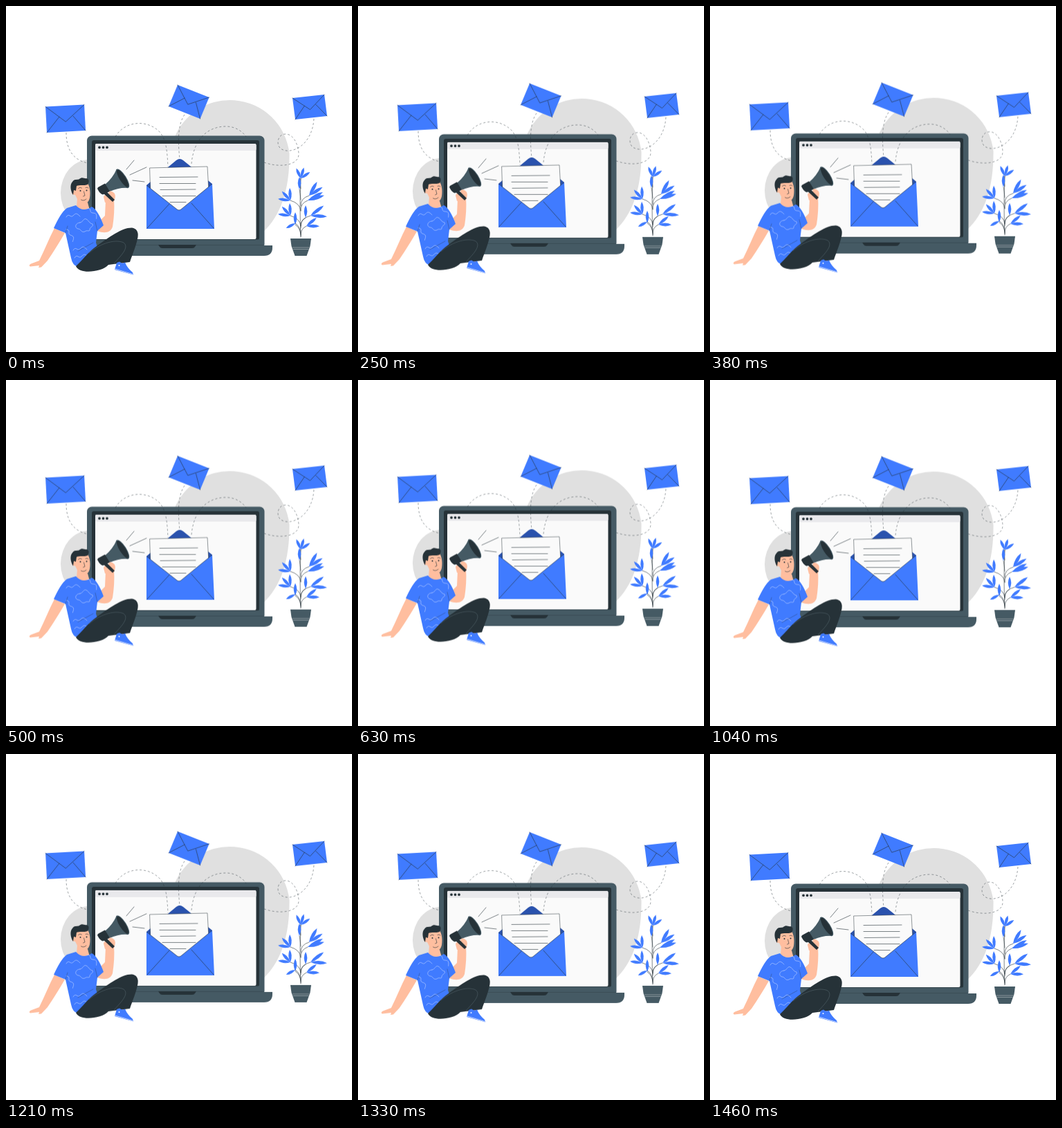
An HTML page that plays this animation: 500x500 px, repeating every 1500 ms.

```html
<!DOCTYPE html>
<html lang="en">
<head>
<meta charset="utf-8">
<title>Newsletter</title>
<style>
  html, body { margin: 0; width: 100%; height: 100%; overflow: hidden; background: #fff; }
  svg { display: block; width: 100vw; height: 100vh; }
  path { stroke-linecap: round; stroke-linejoin: round; }
  .bob { animation: bob 1.5s linear infinite; }
  @keyframes bob {
    0%, 97.33%, 100% { transform: translateY(0); }
    48.67% { transform: translateY(-6.4px); }
  }
  .blue { fill: #407bff; }
  .dark { fill: #263238; }
  .slate { fill: #455a64; }
  .skin { fill: #ffbe9f; }
  .grey { fill: #e0e0e0; }
  .paper { fill: #fafafa; }
  .ink, .dash, .pattern { fill: none; stroke: #263238; stroke-width: .6; vector-effect: non-scaling-stroke; }
  .dash { stroke-width: .45; stroke-dasharray: 3; stroke-linecap: butt; }
  .pattern { stroke: #c3d5ff; }
</style>
</head>
<body>
<svg viewBox="0 0 500 500">
<defs>
  <!-- envelope on a unit square, placed by its two edge vectors -->
  <g id="mail">
    <path class="blue" d="M0 0H1V1H0Z"/>
    <path class="ink" d="M0 0L.5 .62L1 0M0 1L.34 .42M1 1L.7 .42"/>
  </g>
  <path id="wave" class="pattern" d="M-10 2C-6 -5 -4 4 0 0S5 -4 10 1"/>
</defs>
<g class="bob">
  <!-- backdrop -->
  <path class="grey" d="M240 200A86.500 86.500 0 0 1 409.500 213C410 262 399 302 370 328L240 330Z"/>
  <ellipse class="grey" cx="120" cy="270" rx="41" ry="48"/>
  <path class="dash" d="M87 183C87 205 95 222 118 227"/>
  <path class="dash" d="M373 226C395 234 424 231 423 213C422 199 415 185 404 185C392 185 390 201 397 206C410 216 443 203 445 162"/>

  <!-- laptop -->
  <rect class="slate" x="117" y="187.500" width="256.500" height="164" rx="7"/>
  <rect class="dark" x="124" y="194" width="242" height="144" rx="3"/>
  <path class="slate" d="M120 337.500H370V346H120Z"/>
  <rect class="paper" x="129" y="199" width="232.500" height="138" rx="2"/>
  <rect x="129" y="199" width="232.500" height="10" rx="2" fill="#e9e9ec"/>
  <path fill="none" stroke="#263238" stroke-width="3.800" stroke-dasharray="0 5.500" d="M135 204.300h11.500"/>
  <path class="slate" d="M112 346H385V349Q385 361 373 361H112Z"/>
  <path class="ink" stroke-opacity=".55" d="M185 345.500H372"/>
  <path class="dark" d="M220 345H275L273 348Q272 350 269 350H226Q223 350 222 348Z"/>

  <path class="dash" d="M158 189C172 165 205 164 222 182C232 193 233 212 234 232"/>
  <path class="dash" d="M258 157C247 173 249 200 251 222"/>
  <path class="dash" d="M268 228C271 194 290 174 318 174C330 174 341 180 347 189"/>

  <!-- open letter -->
  <path fill="#2a52ad" d="M203 259L246 223Q251 219 256 223L298 257V275H203Z"/>
  <path class="paper" stroke="#263238" stroke-width=".5" d="M208 234L291 232L293 268L250 298L209 268Z"/>
  <path class="ink" d="M222 247.500l55 -.5m-55 9.500h52m-51 9l51 -.5m-48 9.500h48m-37 9h23"/>
  <path class="blue" d="M203 259L246 293Q250 297 254 293L298 257L301 322H203Z"/>
  <path class="ink" d="M203.500 259.500L246 293Q250 297 254 293L297.500 257.500M204 321L236 286M300 321L268 285"/>

  <!-- flying envelopes -->
  <use href="#mail" transform="matrix(56 -3 2 37.500 57 145.500)"/>
  <use href="#mail" transform="matrix(45.500 18 -13 31 248 114)"/>
  <use href="#mail" transform="matrix(46 -5 4 31 414 133)"/>

  <!-- plant -->
  <path class="ink" d="M426 334Q424 290 426 249"/>
  <g id="plant"></g>
  <path class="slate" d="M411 336H441L439.500 347L434.500 361H417.500L412.500 347Z"/>
  <path fill="none" stroke="#b5bec2" stroke-width=".6" d="M414 349H438M415 351.500H437"/>

  <!-- man -->
  <path class="skin" d="M70 321L85 328C77 342 68 356 60 368L51 377.500L47 378L48 375L35 376.500Q32 375 36 372.500L48 368C56 352 62 336 70 321Z"/>
  <path class="skin" d="M128 318L143 303L144 281L156 279C157 293 156 306 154 319C151 328 142 329 132 325Z"/>
  <path class="skin" d="M103 278L118 284L121 295Q111 299 102 290Z"/>
  <path class="blue" d="M101 288Q111 299 124 290Q133 295 141 317L132 325L130 342L133 352L104 377Q96 375 94 364L86 328L69 321C75 308 81 297 88 292Z"/>
  <path class="pattern" d="M107 313C112 312 112 306 116 308S120 314 125 315C127 319 121 319 121 323S117 323 114 326C108 328 109 322 104 322C98 320 101 313 107 313"/>
  <use href="#wave" x="97" y="303"/>
  <use href="#wave" transform="translate(125 299)rotate(50)"/>
  <use href="#wave" transform="translate(93 331)rotate(65)"/>
  <use href="#wave" x="107" y="351"/>
  <use href="#wave" x="109" y="362"/>
  <path class="ink" stroke-opacity=".55" d="M86 328L89 318M132 325L129 312M104 354L126 342"/>

  <path class="skin" d="M161 366L173 367L171 375L160 374Z"/>
  <path class="dark" d="M101 376C110 368 119 355 131 347C149 334 168 320 182 320.500Q192 322 190.500 334C188 347 183 358 179 370L148 374C140 383 118 386 108 382Q103 380 101 376Z"/>
  <path class="ink" style="stroke:#52636b" d="M120 357C138 341 160 337 170 342C179 349 165 362 156 372"/>
  <path class="blue" d="M160 371L164 369.500Q168 373 172 370.500C174 376 178 381 183 385L184 388.500L157 381Z"/>
  <path fill="none" stroke="#c9d9ff" d="M157.500 380L183 387.500"/>
  <circle cx="163.500" cy="375" r="1" fill="#fff"/>

  <path class="skin" d="M97 267C97 257 105 252 114 253C121 256 122.500 268 121 277C119 287 111 288 104 281L100 273Q94 273 95 267Z"/>
  <path class="dark" d="M97 273C93 267 92 258 96 254C99 249 104 252 106 250C110 246 114 250 116 249C121 250 120 255 118 258C113 260 106 258 102 260L101 267L98 266Z"/>
  <path class="ink" d="M104.500 263.500Q107 261 109.500 263M115 262.500Q117 261 119 263M112.500 268L114 274L111.500 275M108.500 280Q112 282.500 116 279"/>
  <circle class="dark" cx="107.500" cy="267" r="1"/>
  <circle class="dark" cx="116.500" cy="266.500" r="1"/>

  <!-- megaphone -->
  <path class="slate" d="M143 258Q154 249 160 235.500L177 263Q163 262 149 268.500Z"/>
  <g transform="translate(168.500 249.300)rotate(-32)">
    <ellipse class="slate" rx="5.500" ry="16"/>
    <ellipse class="dark" rx="4.300" ry="14.500"/>
  </g>
  <path class="dark" d="M133 262L143 256.500L150 268L140 272.500Q136 272 132 264Z"/>
  <path class="skin" d="M143 284L141 276Q142 271 147 274L149 268Q153 266 157 271Q159 276 156 282Z"/>
  <path class="dark" d="M141 271L145 268L157 280L154 283Z"/>
  <path class="ink" d="M174 236L185 223M179 244L203 233M183 252L200 254"/>
</g>
</svg>
<script>
  const at = (x, y, deg, len) => {
    const a = deg * Math.PI / 180;
    return [x + len * Math.cos(a), y + len * Math.sin(a)];
  };

  const leaf = (x, y, deg, len) => {
    const side = turn => at(...at(x, y, deg, len * .55), deg + turn, 2.7 + len * .1);
    return `<path class="blue" d="M${x} ${y}Q${side(90)} ${at(x, y, deg, len)}Q${side(-90)} ${x} ${y}Z"/>`;
  };

  // a twig off the main stem, ending in a fan of leaves
  const twig = (x, y, deg, count, len, spread = 40) => {
    let out = `<path class="ink" d="M426 ${y + 15}Q425 ${y + 4} ${x} ${y}"/>`;
    for (let i = 0; i < count; i++) out += leaf(x, y, deg + (i - (count - 1) / 2) * spread, len);
    return out;
  };

  let plant = twig(426, 249, -74, 3, 16);
  for (const y of [281, 303]) plant += twig(411, y, -133, 3, 18);
  plant += twig(438, 274, -46, 2, 23, 28) + twig(436, 281, -23, 2, 25, 12);
  plant += twig(440, 303, -17, 2, 24) + twig(434, 318, -19, 2, 19);
  for (const [x, y] of [[424, 265], [433, 306], [418, 316]]) plant += twig(x, y, -90, 1, 18);
  plant += twig(418, 314, 152, 1, 15);
  document.getElementById('plant').innerHTML = plant;
</script>
</body>
</html>
```
